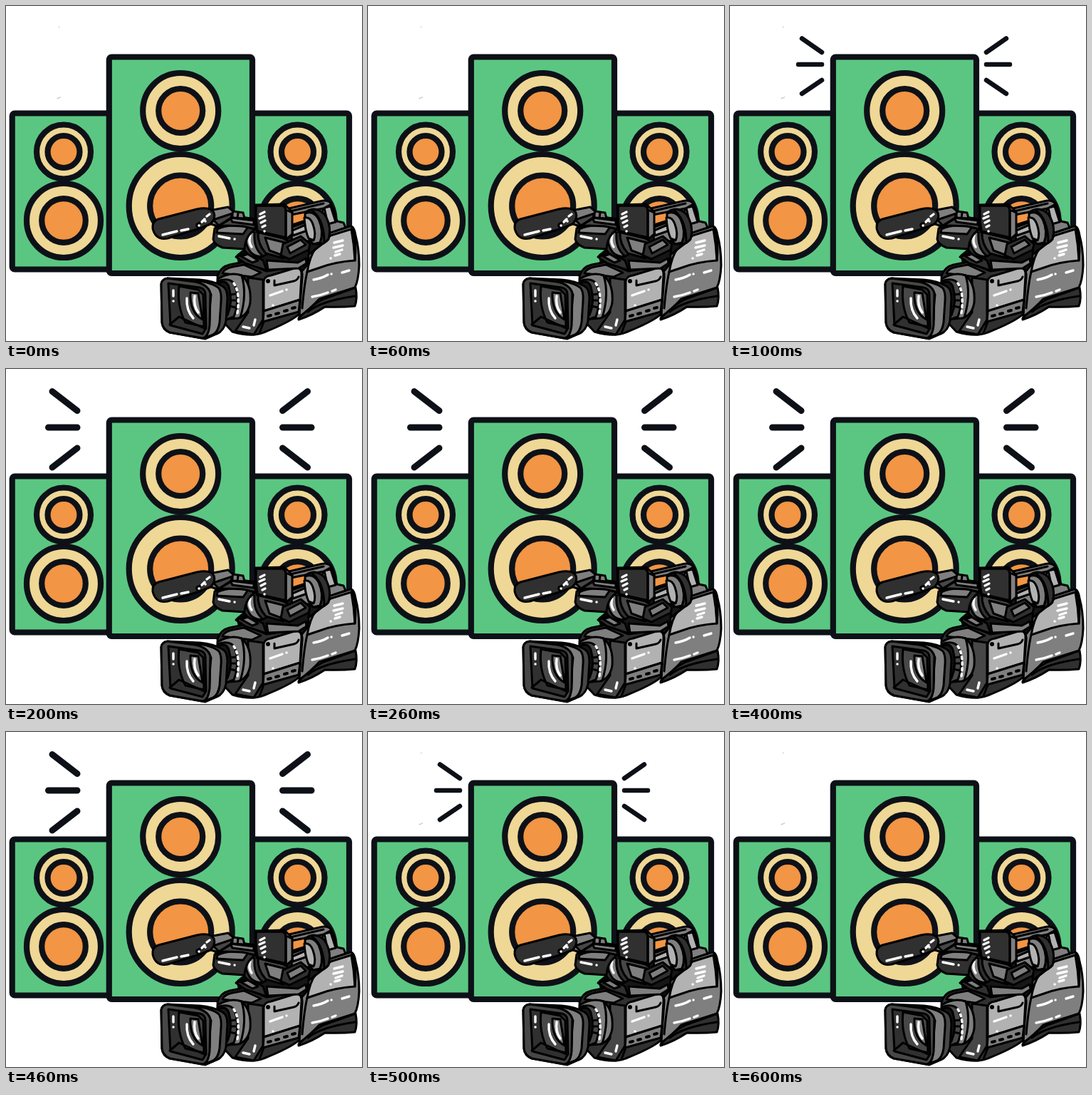
Write an HTML page that moves like this. It is 500 by 470 pixels and loops after 0.7 s.

```html
<!DOCTYPE html>
<html lang="en">
<head>
<meta charset="utf-8">
<title>Speakers and video camera</title>
<style>
  html, body { margin: 0; width: 100%; height: 100%; overflow: hidden; background: #fff; }
  svg { display: block; width: 500px; height: 470px; }

  .speakers { stroke: #0d1117; stroke-width: 8.2; stroke-linejoin: round; }
  .box { fill: #5bc682; }
  .cone { fill: #efd796; }
  .cap { fill: #f29544; }

  .rays { fill: none; stroke: #0d1117; stroke-linecap: round; visibility: hidden; animation: 700ms step-end infinite; }
  .near { stroke-width: 6.5; animation-name: near; }
  .mid { stroke-width: 9; animation-name: mid; }
  .far { stroke-width: 11.5; animation-name: far; }
  .specks { fill: none; stroke: #aaa; stroke-width: .9; animation: specks 700ms step-end infinite; }

  @keyframes near {
    0%, 28.571%, 85.714% { visibility: hidden; }
    14.285%, 71.428% { visibility: visible; }
  }
  @keyframes mid {
    0%, 42.857%, 71.428% { visibility: hidden; }
    28.571%, 57.142% { visibility: visible; }
  }
  @keyframes far {
    0%, 57.142% { visibility: hidden; }
    42.857% { visibility: visible; }
  }
  @keyframes specks {
    0%, 42.857%, 71.428% { visibility: visible; }
    28.571%, 57.142% { visibility: hidden; }
  }

  .camera { stroke: #000; stroke-width: 3; stroke-linejoin: round; stroke-linecap: round; }
  .ink { fill: #161616; }
  .dark { fill: #303030; }
  .deep { fill: #474747; }
  .gray { fill: #7f7f7f; }
  .pale { fill: #b2b2b2; }
  .line { fill: none; }
  .shine { fill: none; stroke: #fff; stroke-width: 3.4; }
</style>
</head>
<body>
<svg viewBox="0 0 500 470">
  <defs>
    <g id="small">
      <circle class="cone" cy="204.5" r="38"/>
      <circle class="cap" cy="204.5" r="22.5"/>
      <circle class="cone" cy="301" r="52"/>
      <circle class="cap" cy="301" r="30.8"/>
    </g>
    <path id="nearRays" d="M101 45.5L129 65M96 82H129M101 123L129 104"/>
    <path id="midRays" d="M65 31.5L100 58.5M59.5 82H100M65 138L100 111"/>
    <path id="farRays" d="M29 14.5L71.5 50M22.5 81H71M29 156L71.5 119"/>
  </defs>

  <g class="speakers">
    <rect class="box" x="8.7" y="150.5" width="140" height="219" rx="3.5"/>
    <rect class="box" x="342" y="150.5" width="140" height="219" rx="3.5"/>
    <use href="#small" x="81"/>
    <use href="#small" x="409.5"/>
    <rect class="box" x="144.8" y="71.5" width="201.2" height="303.5" rx="3.5"/>
    <circle class="cone" cx="245.2" cy="147" r="53"/>
    <circle class="cap" cx="245.2" cy="147" r="31"/>
    <circle class="cone" cx="245.2" cy="280.5" r="72.5"/>
    <circle class="cap" cx="245.2" cy="280.5" r="43"/>
  </g>

  <path class="specks" d="M71.5 129.5Q75 129.5 77 127.5M74 29.5h1.5"/>
  <g class="rays near"><use href="#nearRays"/><use href="#nearRays" transform="matrix(-1 0 0 1 489 0)"/></g>
  <g class="rays mid"><use href="#midRays"/><use href="#midRays" transform="matrix(-1 0 0 1 488.5 0)"/></g>
  <g class="rays far"><use href="#farRays"/><use href="#farRays" transform="matrix(-1 0 0 1 488.5 0)"/></g>

  <g class="camera">
    <!-- rear body -->
    <path class="dark" d="M411 438Q428 420 446 411L491 395Q494 410 490 421Q470 423 448 422Q430 434 411 440Z"/>
    <path class="line" d="M424 429Q442 414 490 407"/>
    <path class="gray" d="M412 352L450 319L484 309Q489 309 491 322Q496 340 496 364Q495 385 490 395L440 411Q428 424 412 436Z"/>
    <path class="pale" d="M423 373Q427 350 435 340L456 322L485 313Q489 335 490 357Q462 359 441 367Z"/>
    <path class="line" d="M416 424Q419 390 423 373M486 310Q493 330 490 357"/>
    <path class="shine" d="M461 332L473 329M460 339L473 336M463 345L472 342M462 350L469 348M456 354h.1"/>
    <path class="shine" d="M432 384Q444 382 452 377M457 376h.1M472 374L482 371M430 408Q442 406 452 402M458 400L463 398"/>

    <!-- carrying handle and eyepiece -->
    <path class="gray" d="M449 275Q456 273 458 280L465 302L474 304L477 311L453 319L440 300Z"/>
    <path class="pale" d="M447 283L456 281L463 303L452 306Z"/>
    <path class="gray" d="M393 285L441 274Q453 271 457 278L446 284L400 293Z"/>
    <path class="line" d="M399 288L446 277"/>
    <path class="ink" d="M396 309L424 300L452 328L426 348L382 358L350 350Z"/>
    <path class="gray" d="M400 311L424 302Q433 315 430 329L402 333Z"/>
    <path class="pale" d="M402 315L423 306L426 314L403 322Z"/>
    <path class="dark" d="M421 289Q435 280 447 292Q458 308 453 327Q446 336 435 334Z"/>
    <path class="gray" d="M420 291Q432 286 439 299Q447 317 441 332L431 334Q424 325 420 308Z"/>
    <path class="pale" d="M419 297Q427 295 431 306Q436 320 432 329L425 326Q420 315 419 297Z"/>
    <path class="line" d="M430 287Q447 300 447 332"/>

    <!-- front body -->
    <path class="ink" d="M325 350L345 334L405 345L426 336L424 362L414 374L370 384L330 371Z"/>
    <path class="dark" d="M297 379Q301 366 314 363L334 359L366 372L408 366Q417 369 416 380L412 432Q400 443 362 458Q346 465 318 457L302 440Z"/>
    <path class="gray" d="M304 375Q307 368 318 366L334 363L358 374L345 380Z"/>
    <path class="deep" d="M340 381L361 384L361 440L348 461L322 456L340 430Z"/>
    <path class="pale" d="M362 386Q363 379 372 378L408 367Q416 368 415 378L413 412L362 428Z"/>
    <path class="gray" d="M362 428L413 412L411 429L361 443Z"/>
    <path class="line" d="M377 385v7l27-6q5-1 7-6M362 443L356 459"/>
    <circle class="ink" cx="368" cy="386" r="1.5"/>
    <path class="line" stroke-width="4" d="M368 435l4-1M379 432l4-1M391 428l4-1M402 424l4-1"/>
    <path class="shine" d="M371 406L388 400M394 398h.1M333 450L342 452M348 448L350 440M375 420h.1"/>

    <!-- connecting parts -->
    <path class="gray" d="M366 357L410 360L421 354L422 361L411 368L368 370Z"/>
    <path class="dark" d="M323 352L340 345L361 357L366 371L336 361Z"/>
    <path class="gray" d="M330 351L340 348L354 357L346 360Z"/>
    <ellipse class="dark" cx="352" cy="330" rx="21" ry="23" transform="rotate(-18 352 330)"/>
    <path class="gray" d="M340 314Q332 330 344 346Q352 353 361 351Q347 340 349 318Z"/>
    <path class="deep" d="M354 317L388 325L402 334L390 354L365 347Q353 334 354 317Z"/>
    <path class="gray" d="M364 325L392 332L386 349L370 343Z"/>
    <path class="dark" d="M389 334L414 323L427 334L425 342L398 355L386 350Z"/>
    <path class="gray" d="M395 338L414 328L421 335L399 347Z"/>
    <path class="shine" stroke-width="2" d="M343 322Q340 331 345 338"/>

    <!-- microphone -->
    <path class="dark" d="M293 312Q306 304 336 306L349 314Q336 323 335 341L304 339Q292 334 291 327Z"/>
    <path class="gray" d="M297 313Q313 305 340 310L333 320Q312 319 296 318Z"/>
    <path class="deep" d="M294 309Q302 293 317 294L350 299L350 313L333 309L310 308Z"/>
    <path class="gray" d="M315 297L348 301L348 307L318 303Z"/>
    <path class="gray" d="M286 287L312 282L319 288L333 290L335 298L318 297L298 309L288 306Z"/>
    <path class="deep" d="M291 300L318 291L318 296L299 308Z"/>
    <path class="line" d="M319 288L316 297M326 290L325 298"/>
    <path class="dark" d="M206 312Q205 302 214 299L268 285Q287 281 292 290Q295 298 287 306L272 312L227 326Q210 329 206 312Z"/>
    <path class="line" d="M270 311Q264 306 273 304"/>
    <path class="shine" d="M220 321L240 316M246 315L256 313M271 308h.1M275 303L279 299M282 295L286 292M280 302h.1M299 323L314 326M321 327h.1"/>

    <!-- flip-out screen -->
    <path class="gray" d="M350 279L391 278L402 289L402 320L394 327L352 317Z"/>
    <path class="dark" stroke-width="3.6" d="M351 280L388 280Q392 281 393 286L393 325L353 316Q350 300 351 280Z"/>
    <path class="line" d="M393 286L402 290"/>
    <path class="shine" d="M357 292L363 289M356 298L363 295M358 304L364 301M360 310L364 308M363 316h.1"/>

    <!-- lens barrel -->
    <path class="gray" d="M297 383Q315 372 331 378Q345 390 343 416Q340 434 326 438L300 440Z"/>
    <path class="deep" d="M297 386Q314 380 321 390Q329 412 320 436L298 444Z"/>
    <path class="ink" d="M298 389Q309 383 313 394Q319 415 311 434L298 444Z"/>
    <path class="line" d="M315 405L323 404M315 413L324 413M314 421L323 423M331 378Q339 405 329 437"/>
    <path class="shine" stroke-dasharray="3 5" d="M320 389Q329 402 325 431"/>

    <!-- lens hood -->
    <path class="deep" d="M218 390Q219 383 227 382L272 384Q292 386 304 393Q311 397 311 410L309 442Q306 456 296 460L280 467L230 458Q220 454 219 444Z"/>
    <path class="gray" d="M266 385Q290 388 299 396Q303 402 302 414L300 444Q298 457 291 461L281 465Q287 450 286 425L288 405Q284 394 266 385Z"/>
    <path class="deep" d="M218 390Q219 383 227 382L266 387Q284 391 287 403L286 448Q284 465 276 466L230 458Q220 454 219 444Z"/>
    <path class="dark" d="M228 389L272 395Q280 397 280 404L281 452L276 460L231 448Z"/>
    <path class="deep" d="M243 393L270 398L277 405L278 450L252 444Q240 422 243 393Z"/>
    <path class="gray" d="M259 402L270 403L276 440Q258 430 259 402Z"/>
    <path class="line" d="M230 447L243 436L278 452"/>
    <path class="shine" d="M235 399V407M235 414h.1M254 410Q253 427 263 438M265 407Q263 420 270 430"/>
  </g>
</svg>
</body>
</html>
```
